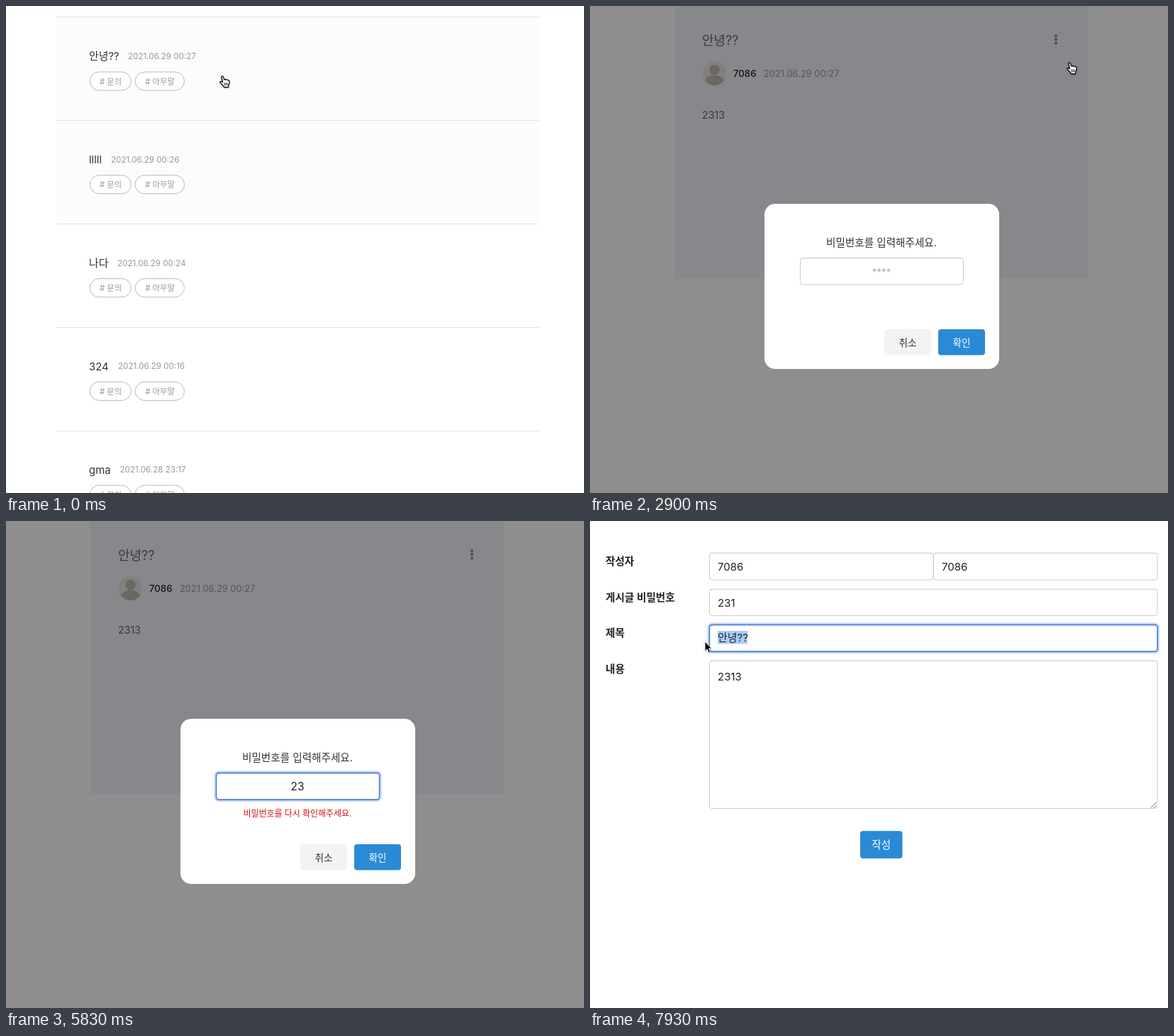
Recreate the animation shown at these times as an HTML page. Size 815 by 687 pixels, loop 8000 ms.

```html
<!DOCTYPE html>
<html lang="ko">
<head>
<meta charset="utf-8">
<title>게시판</title>
<style>
html, body { margin: 0; width: 100%; height: 100%; overflow: hidden; background: #fff; }
svg { display: block; width: 815px; height: 687px; }
text { font-family: Inter, "Noto Sans CJK KR", "Noto Sans CJK", sans-serif; white-space: pre; }
.hidden { display: none; }
</style>
</head>
<body>
<svg id="stage" viewBox="0 0 815 687">
  <defs>
    <clipPath id="face"><circle cx="175.5" cy="95" r="17"/></clipPath>
    <filter id="soft" x="-50%" y="-50%" width="200%" height="200%">
      <feDropShadow dx="0" dy="1" stdDeviation="1" flood-opacity=".3"/>
    </filter>
  </defs>
  <g id="list"></g>
  <g id="detail"></g>
  <g id="menu"></g>
  <g id="modal"></g>
  <g id="form"></g>
  <g id="cursor" filter="url(#soft)">
    <path id="arrow" d="M0 0V13.6L3.1 10.8L5.3 15.8L7.7 14.8L5.6 9.9H9.6Z" fill="#000" stroke="#fff" stroke-width="1"/>
    <g id="hand" transform="translate(-4 -1)" stroke="#000" stroke-linecap="round" stroke-linejoin="round">
      <path d="M4.6 9.6L2.9 2.5C2.6.7 4.9.2 5.4 1.9L6.7 6.2C7.1 5 8.9 5.1 9.2 6.3C9.8 5.4 11.3 5.5 11.7 6.9C12.5 6.3 13.9 6.8 14 8.2C14.3 10.6 13.8 12 12.8 13.7L12.5 16.6H6.4L5.9 15.1C4.5 13.7 2.5 11.5 1 9.9C.3 8.8 1.6 7.8 2.7 8.6Z" fill="#fff" stroke-width="1.2"/>
      <path d="M7.1 10.8V13.8M9.1 10.8V13.8M11.1 10.8V13.8" fill="none" stroke-width=".9"/>
    </g>
    <path id="beam" d="M-3 -8Q0 -8 0 -6Q0 -8 3 -8M0 -6V6M-3 8Q0 8 0 6Q0 8 3 8M-1.7 3H1.7" fill="none" stroke="#222" stroke-width="1.2"/>
  </g>
</svg>
<script>
const LOOP = 8000;
const BLUE = '#2b8ad6', BLUE_HOVER = '#2180cb', SELECTION = '#a9cdf7';
const AUTHOR = '7086';
const $ = id => document.getElementById(id);

function add(parent, tag, attrs, content = '') {
  const el = document.createElementNS('http://www.w3.org/2000/svg', tag);
  for (const key in attrs) el.setAttribute(key, attrs[key]);
  el.textContent = content;
  return parent.appendChild(el);
}
const box = (g, x, y, width, height, fill, more) =>
  add(g, 'rect', { x, y, width, height, fill, ...more });
const label = (g, x, y, size, fill, content, more) =>
  add(g, 'text', { x, y, 'font-size': size, fill, ...more }, content);
const centered = { 'text-anchor': 'middle' };
const show = (el, on) => el.classList.toggle('hidden', !on);

function field(g, x, y, w, h) {
  box(g, x + .5, y + .5, w - 1, h - 1, '#fff', { rx: 3.5, stroke: '#ccc' });
  box(g, x + 2, y + 1, w - 4, 1.5, '#000', { opacity: .05 });
}
function focusRing(g, x, y, w, h) {
  const ring = add(g, 'g', {});
  box(ring, x - 1, y - 1, w + 2, h + 2, 'none', { rx: 5, stroke: '#8fb4f5', 'stroke-opacity': .55, 'stroke-width': 3 });
  box(ring, x + .5, y + .5, w - 1, h - 1, 'none', { rx: 3.5, stroke: '#3c74d8', 'stroke-width': 1.4 });
  return ring;
}

function buildList(g) {
  const rows = [
    ['안녕??', '2021.06.29 00:27', 172],
    ['lllll', '2021.06.29 00:26', 148],
    ['나다', '2021.06.29 00:24', 157],
    ['324', '2021.06.29 00:16', 158],
    ['gma', '2021.06.28 23:17', 160.5]
  ];
  const fills = rows.map(([title, date, dateX], i) => {
    const y = i * 145.8;
    const fill = box(g, 71, Math.round(y + 15.5), 681, 146, i < 2 ? '#fcfcfc' : '#fff');
    box(g, 71, Math.round(y + 15.4), 681, 1, '#e3e3e3');
    label(g, 117, y + 76.4, 14.9, '#333', title);
    label(g, dateX, y + 75, 11.6, '#999', date);
    [['# 문의', 118, 59], ['# 아무말', 182, 70]].forEach(([tag, x, w]) => {
      box(g, x + .2, y + 93, w - .7, 26, '#fff', { rx: 13, stroke: '#b8b8b8' });
      label(g, x + w / 2, y + 110.6, 11.35, '#999', tag, centered);
    });
    return fill;
  });
  return fills[1];
}

function buildDetail(g) {
  box(g, 120, 0, 583, 385, '#f2f3f9');
  label(g, 158, 54.6, 18, '#666', '안녕??');
  const avatar = add(g, 'g', { 'clip-path': 'url(#face)' });
  box(avatar, 158, 77, 35, 36, '#e7e5e1');
  add(avatar, 'circle', { cx: 175.5, cy: 90, r: 7.3, fill: '#bfb8b2' });
  add(avatar, 'ellipse', { cx: 175.5, cy: 109, rx: 14, ry: 11.5, fill: '#bfb8b2' });
  label(g, 202, 100.2, 13.2, '#222', AUTHOR, { 'font-weight': 500 });
  label(g, 245, 100.2, 12.9, '#999', '2021.06.29 00:27');
  label(g, 158, 159.3, 14.2, '#666', '2313');
  [42, 47.2, 52.4].forEach(cy => add(g, 'circle', { cx: 657, cy, r: 2.1, fill: '#8c8d95' }));
}

function buildMenu(g) {
  box(g, 653.5, 65.5, 49, 79, '#fff', { stroke: '#ddd' });
  label(g, 678, 89, 12.5, '#444', '수정', centered);
  label(g, 678, 129, 12.5, '#444', '삭제', centered);
}

function buildModal(g) {
  box(g, 0, 0, 815, 687, '#000', { opacity: .443 });
  box(g, 246, 279, 331, 233, '#fff', { rx: 15 });
  label(g, 411, 338.6, 14.6, '#333', '비밀번호를 입력해주세요.', centered);
  field(g, 296, 355, 231, 38.5);
  const inputRing = focusRing(g, 296, 355, 231, 38.5);
  const mark = box(g, 404, 362, 14, 21, SELECTION);
  const hint = label(g, 411, 379.5, 13.3, '#aaa', '****', centered);
  const value = label(g, 411, 380, 15.4, '#222', '', centered);
  const error = label(g, 411, 416.6, 11.95, '#d01212', '비밀번호를 다시 확인해주세요.', centered);
  box(g, 415, 456, 66, 36.5, '#f3f3f3', { rx: 4 });
  label(g, 448, 479.7, 13.6, '#333', '취소', centered);
  const buttonRing = box(g, 490, 455, 68, 38.5, 'none', { rx: 5, stroke: '#a9cff3', 'stroke-width': 3 });
  const button = box(g, 491, 456, 66, 36.5, BLUE, { rx: 4 });
  label(g, 524, 479.7, 13.6, '#fff', '확인', centered);
  return { inputRing, mark, hint, value, error, buttonRing, button };
}

function buildForm(g) {
  box(g, 0, 0, 815, 687, '#fff');
  [['작성자', 62.2], ['게시글 비밀번호', 112.6], ['제목', 163.2], ['내용', 213.6]].forEach(([name, y]) =>
    label(g, 22, y, 14.6, '#222', name, { 'font-weight': 600 }));
  field(g, 168, 44.5, 316.5, 39);
  field(g, 484, 44.5, 316.5, 39);
  field(g, 168, 95.5, 632.5, 38.5);
  field(g, 168, 146, 632.5, 38.5);
  field(g, 168, 196.5, 632.5, 209.5);
  const ring = focusRing(g, 168, 146, 632.5, 38.5);
  const mark = box(g, 180, 155, 42, 18.5, SELECTION);
  [[180, 70, AUTHOR], [496, 70, AUTHOR], [180, 120.6, '231'], [180, 169.8, '안녕??'], [180, 225.4, '2313']]
    .forEach(([x, y, content]) => label(g, x, y, 15, '#222', content));
  add(g, 'path', { d: 'M791 404.5L798.5 397M795.5 404.5L798.5 401.5', stroke: '#666', fill: 'none' });
  box(g, 381, 437.3, 59.5, 38.7, BLUE, { rx: 4 });
  label(g, 410.7, 462, 14.6, '#fff', '작성', centered);
  return { ring, mark };
}

const secondRow = buildList($('list'));
buildDetail($('detail'));
buildMenu($('menu'));
const modal = buildModal($('modal'));
const form = buildForm($('form'));

// time, x, y, pointer shape from that time on
const POINTER = [
  [0, 305, 99, 'hand'], [70, 304, 98, 'hand'], [970, 304, 98, 'arrow'],
  [1210, 303, 90, 'arrow'], [1660, 303, 90, 'arrow'], [1790, 640, 26, 'arrow'],
  [1890, 660, 40, 'hand'], [2070, 657, 46, 'hand'], [2240, 657, 46, 'hand'],
  [2620, 676, 80, 'hand'], [2930, 676, 80, 'arrow'], [3240, 438, 356, 'beam'],
  [3280, 430, 372, 'beam'], [3560, 430, 372, 'none'], [3780, 430, 372, 'beam'],
  [3860, 456, 398, 'arrow'], [4070, 525, 478, 'arrow'], [4760, 525, 478, 'arrow'],
  [4960, 448, 421, 'beam'], [5000, 432, 408, 'beam'], [5170, 424, 373, 'beam'],
  [5380, 424, 373, 'beam'], [5520, 378, 373, 'beam'], [5760, 378, 373, 'none'],
  [6160, 378, 373, 'beam'], [6240, 400, 394, 'arrow'], [6580, 518, 488, 'arrow'],
  [6830, 518, 488, 'arrow'], [6960, 444, 406, 'beam'], [7340, 226, 166, 'beam'],
  [7520, 226, 166, 'beam'], [7690, 171, 174, 'beam'], [7830, 171, 174, 'arrow'],
  [7930, 162, 170, 'arrow'], [LOOP, 162, 170, 'arrow']
];
const PASSWORD = [[0, ''], [3560, '1'], [3690, '11'], [5760, '2'], [5830, '23'], [6000, '231']];

const clamp = (v, lo, hi) => Math.min(hi, Math.max(lo, v));
const during = (t, from, to) => t >= from && t < to;

function pointerAt(t) {
  const i = POINTER.findIndex((key, n) => n && t < key[0]);
  const [t0, x0, y0, shape] = POINTER[i - 1], [t1, x1, y1] = POINTER[i];
  const p = (t - t0) / (t1 - t0);
  return { x: x0 + (x1 - x0) * p, y: y0 + (y1 - y0) * p, shape };
}

function selectFrom(mark, x, left, right) {
  const start = clamp(x, left, right);
  mark.setAttribute('x', start);
  mark.setAttribute('width', right - start);
}

function render(t) {
  const { x, y, shape } = pointerAt(t);

  show($('list'), t < 970);
  show($('detail'), during(t, 970, 6660));
  show($('menu'), during(t, 2240, 2900));
  show($('modal'), during(t, 2900, 6660));
  show($('form'), t >= 6660);
  secondRow.setAttribute('fill', t < 70 ? '#fcfcfc' : '#fff');

  const password = PASSWORD.filter(([at]) => t >= at).pop()[1];
  modal.value.textContent = password;
  show(modal.hint, !password);
  show(modal.inputRing, during(t, 3450, 4240) || during(t, 5380, 6600));
  show(modal.buttonRing, during(t, 4240, 5380));
  show(modal.error, t >= 4310);
  show(modal.mark, during(t, 5380, 5760));
  selectFrom(modal.mark, x, 404, 418);
  const hover = x > 491 && x < 557 && y > 456 && y < 493;
  modal.button.setAttribute('fill', hover ? BLUE_HOVER : BLUE);

  show(form.ring, t >= 7520);
  show(form.mark, t >= 7520);
  selectFrom(form.mark, x, 180, 222);

  ['arrow', 'hand', 'beam'].forEach(name => show($(name), name === shape));
  $('cursor').setAttribute('transform', `translate(${x.toFixed(2)} ${y.toFixed(2)})`);
}

const begun = performance.now();
function tick() {
  render((performance.now() - begun) % LOOP);
  requestAnimationFrame(tick);
}
tick();
</script>
</body>
</html>
```
